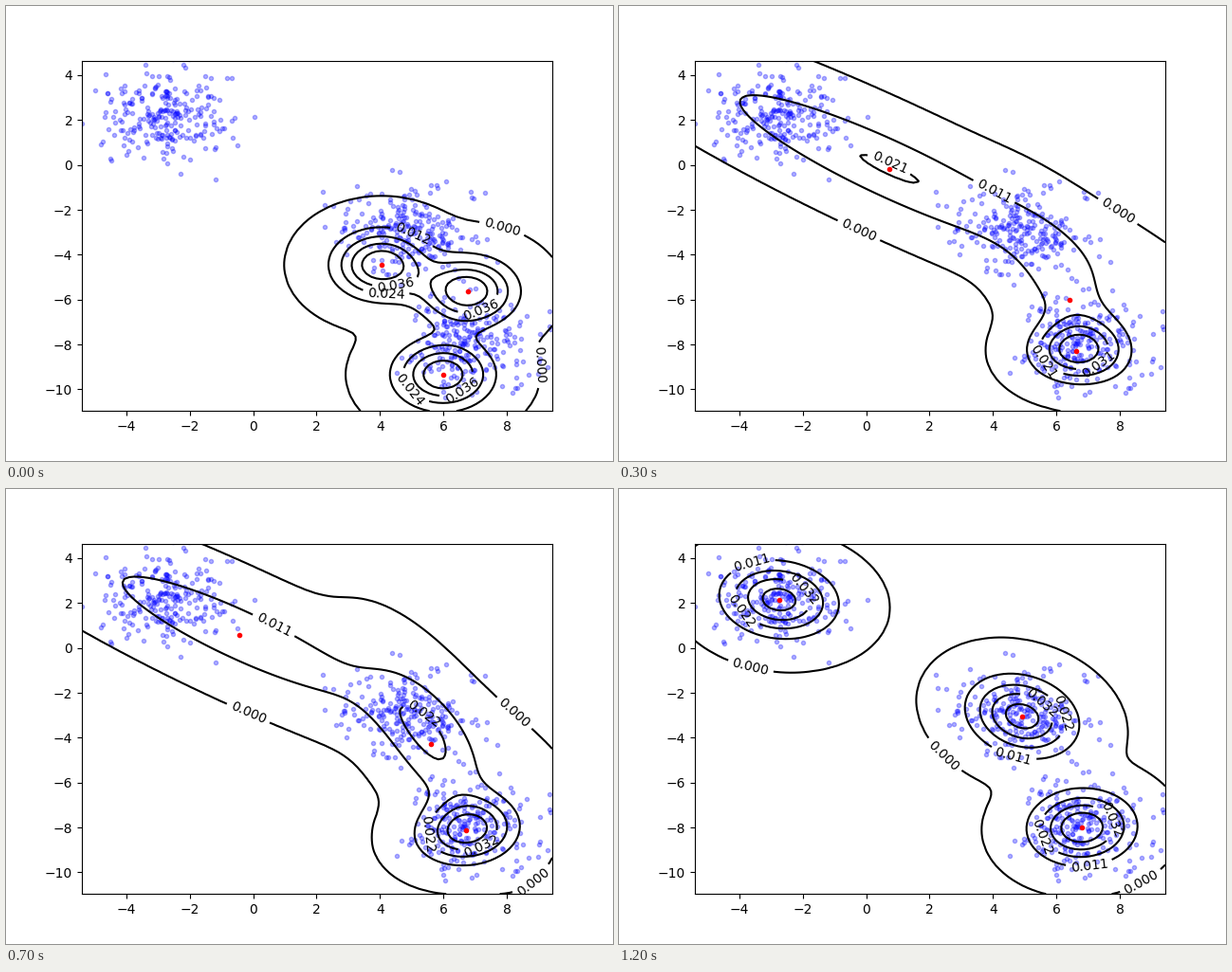
Write a matplotlib script that moves like this. It is 640 by 480 pixels and loops after 1300 ms.

```python
import numpy as np
import matplotlib.pyplot as plt
from matplotlib.animation import FuncAnimation

FRAMES, INTERVAL = 13, 100
XLIM, YLIM = (-5.404, 9.437), (-10.96, 4.65)
FLOOR = 0.0003  # density of the outermost contour
EPS = 1e-21     # keeps far points from counting in the first step

# Blobs: center, then var x, var y, cov
BLOBS = [
    ((-2.78, 2.18), (1.04, .95, 0)),
    ((4.86, -2.93), (1.08, .92, -.12)),
    ((6.79, -7.93), (.957, 1.05, 0)),
]
START = np.array([(4.05, -4.45), (6.77, -5.63), (5.99, -9.34)])
START_VAR = 0.887


def blob(rng, center, shape, n=250):
    """Seeded Gaussian points with exactly the given mean and covariance."""
    vx, vy, c = shape
    z = rng.standard_normal((n, 2))
    z -= z.mean(axis=0)
    z = z @ np.linalg.inv(np.linalg.cholesky(np.cov(z.T, bias=True))).T
    return center + z @ np.linalg.cholesky([[vx, c], [c, vy]]).T


def densities(points, weights, means, covs):
    """Weighted density of each component, one column per component."""
    cols = []
    for w, m, cov in zip(weights, means, covs):
        d = points - m
        dist = np.sum(d @ np.linalg.inv(cov) * d, axis=1)
        norm = 2 * np.pi * np.sqrt(np.linalg.det(cov))
        cols.append(w * np.exp(-dist / 2) / norm)
    return np.column_stack(cols)


def em_step(points, state):
    p = densities(points, *state)
    resp = p / (p.sum(axis=1, keepdims=True) + EPS)
    total = resp.sum(axis=0)
    means = resp.T @ points / total[:, None]
    covs = []
    for r, m, t in zip(resp.T, means, total):
        d = points - m
        covs.append((r[:, None] * d).T @ d / t)
    return total / len(points), means, np.array(covs)


rng = np.random.default_rng(7)
data = np.vstack([blob(rng, *b) for b in BLOBS])

states = [(np.full(3, 1 / 3), START, np.array([np.eye(2) * START_VAR] * 3))]
while len(states) < FRAMES:
    states.append(em_step(data, states[-1]))

gx, gy = np.meshgrid(np.linspace(*XLIM, 100), np.linspace(*YLIM, 100))
grid = np.column_stack([gx.ravel(), gy.ravel()])

fig, ax = plt.subplots(figsize=(6.4, 4.8), dpi=100)


def draw(i):
    ax.clear()
    ax.set(xlim=XLIM, ylim=YLIM)
    ax.plot(*data.T, "b.", alpha=0.3)

    z = densities(grid, *states[i]).sum(axis=1).reshape(gx.shape)
    levels = np.linspace(FLOOR, z.max(), 6)[:-1]
    lines = ax.contour(gx, gy, z, levels, colors="k")
    lines.clabel(fmt="%1.3f")

    ax.plot(*states[i][1].T, "r.")
    return []


anim = FuncAnimation(fig, draw, frames=FRAMES, interval=INTERVAL, repeat=True)
plt.show()
```
